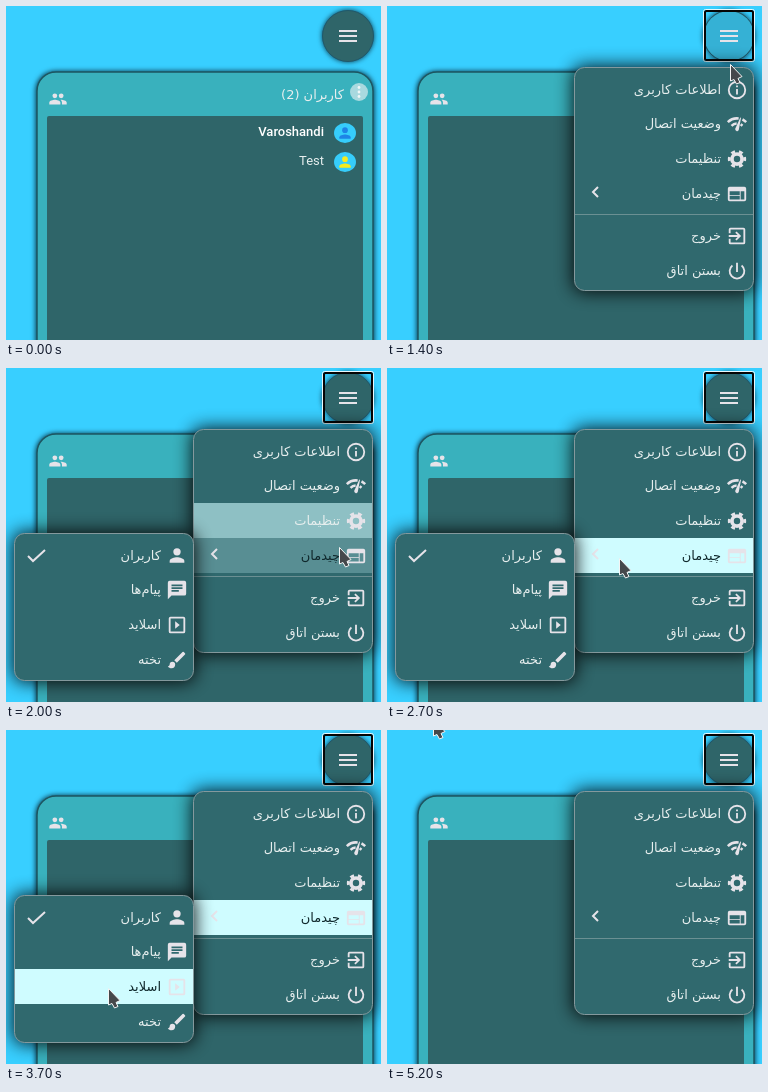
These frames come from a looping animation (375x334 px, 5300 ms). An HTML page:

```html
<!DOCTYPE html>
<html lang="fa">
<head>
<meta charset="utf-8">
<style>
html, body { margin: 0; width: 100%; height: 100%; overflow: hidden; background: #38cfff; }
svg { display: block; }
text { font: 13px "DejaVu Sans", sans-serif; fill: #e6eeee; }
.fa { direction: rtl; text-anchor: start; }
.user { font-family: Roboto, sans-serif; text-anchor: end; }
.strong { font-weight: 500; fill: #fff; }
.icon { fill: #e6e3e9; fill-rule: evenodd; }
.line { fill: none; stroke: #e6e3e9; stroke-width: 2; }
.shade { filter: blur(9px); fill: #000; opacity: .9; }
.soft { filter: blur(2.5px); fill: #0b3a4c; }
</style>
</head>
<body>
<svg id="stage" width="375" height="334" viewBox="0 0 375 334"></svg>
<script>
const LOOP = 5300, STEP = 100;
const stage = document.getElementById('stage');

function add(parent, tag, attrs = {}, text) {
  const el = document.createElementNS('http://www.w3.org/2000/svg', tag);
  for (const k in attrs) el.setAttribute(k, attrs[k]);
  if (text) el.textContent = text;
  parent.append(el);
  return el;
}

const path = d => `<path d="${d}"/>`;
const line = d => `<path class="line" d="${d}"/>`;
const person = '<circle cx="12" cy="8" r="4"/>' + path('M12 14c-2.7 0-8 1.3-8 4v2h16v-2c0-2.7-5.3-4-8-4z');
const icons = {
  info: '<circle class="line" cx="12" cy="12" r="9"/>' + line('M12 11v6M12 7v2'),
  signal: '<path class="line" style="stroke-width:2.8" d="M2 10A14.2 14.2 0 0 1 13.8 6M18 7Q20.3 8.3 22 10M6 14Q8.5 11.6 11.6 11.5M16 12.4L18 14"/>' +
    path('M16.4 5.2L14 18.4A2 2 0 1 1 10.2 17L15.5 5.2Q16 4.6 16.4 5.2z'),
  gear: '<circle class="line" cx="12" cy="12" r="5.5" style="stroke-width:4"/>' +
    '<circle class="line" cx="12" cy="12" r="8.4" pathLength="12" stroke-dasharray="1" stroke-dashoffset=".5" style="stroke-width:3.2"/>',
  layout: path('M4 4h16a2 2 0 0 1 2 2v12a2 2 0 0 1-2 2H4a2 2 0 0 1-2-2V6a2 2 0 0 1 2-2zM4 9v4h11V9zM4 14v4h11v-4zM16 9v9h4V9z'),
  exit: path('M10.1 15.6L11.5 17l5-5-5-5-1.4 1.4L12.7 11H3v2h9.7zM3 9V5a2 2 0 0 1 2-2h14a2 2 0 0 1 2 2v14a2 2 0 0 1-2 2H5a2 2 0 0 1-2-2v-4h2v4h14V5H5v4z'),
  power: line('M12 3v10M17 6A8 8 0 1 1 7 6'),
  person,
  chat: path('M20 2H4a2 2 0 0 0-2 2v18l4-4h14a2 2 0 0 0 2-2V4a2 2 0 0 0-2-2zM6 6h12v2H6zM6 9h12v2H6zM6 12h8v2H6z'),
  slide: path('M10 8v8l5-4zM19 3H5a2 2 0 0 0-2 2v14a2 2 0 0 0 2 2h14a2 2 0 0 0 2-2V5a2 2 0 0 0-2-2zM5 5h14v14H5z'),
  brush: path('M7 14a3 3 0 0 0-3 3c0 1.3-1.2 2-2 2 .9 1.2 2.5 2 4 2a4 4 0 0 0 4-4 3 3 0 0 0-3-3zM20.7 4.6l-1.3-1.3a1 1 0 0 0-1.4 0L9 12.3 11.8 15l8.9-9a1 1 0 0 0 0-1.4z'),
  group: '<circle cx="16" cy="8" r="3"/><circle cx="8" cy="8" r="3"/>' +
    path('M8 13c-2.3 0-7 1.2-7 3.5V19h14v-2.5C15 14.2 10.3 13 8 13zM16 13l-1 .1c1.2.8 2 2 2 3.4V19h6v-2.5c0-2.3-4.7-3.5-7-3.5z')
};

function icon(parent, name, cx, cy, size, fill) {
  const s = size / 24;
  const g = add(parent, 'g', { class: 'icon', transform: `translate(${cx - size / 2} ${cy - size / 2}) scale(${s})` });
  if (fill) g.style.fill = fill;
  g.innerHTML = icons[name];
}

// user panel
add(stage, 'rect', { class: 'soft', x: 29.5, y: 65, width: 339, height: 300, rx: 20 });
add(stage, 'rect', { x: 31, y: 66, width: 336, height: 300, rx: 19, fill: '#39b1bd', stroke: '#1d5661', 'stroke-width': 1.5 });
add(stage, 'rect', { x: 41, y: 110, width: 316, height: 240, rx: 2, fill: '#2f6569' });
icon(stage, 'group', 52, 93, 19);
add(stage, 'text', { class: 'fa', x: 338, y: 93 }, 'کاربران (2)');
add(stage, 'circle', { cx: 353, cy: 86, r: 9, fill: '#a8d9df' });
for (const y of [81.5, 86, 90.5]) add(stage, 'circle', { cx: 353, cy: y, r: 1.4, fill: '#f0f6f7' });
[['Varoshandi', 127, '#1e83e6', ' strong'], ['Test', 156, '#f6ea1c', '']].forEach(([name, y, fill, cls]) => {
  add(stage, 'text', { class: 'user' + cls, x: 318, y: y + 3 }, name);
  add(stage, 'ellipse', { cx: 339, cy: y, rx: 11, ry: 10, fill: '#36cdfb' });
  icon(stage, 'person', 339, y, 17, fill);
});

// round button
add(stage, 'circle', { class: 'soft', cx: 342, cy: 30, r: 26 });
add(stage, 'circle', { cx: 342, cy: 30, r: 25.5, fill: '#2f6569', stroke: '#20586a' });
const glow = add(stage, 'circle', { cx: 342, cy: 30, r: 25, fill: '#38cfff' });
add(stage, 'path', { class: 'line', d: 'M333 25h18M333 30h18M333 35h18' });
const focus = add(stage, 'g', { fill: 'none' });
add(focus, 'rect', { x: 316.5, y: 3.5, width: 51, height: 52, rx: 2, stroke: '#e8f8fc' });
add(focus, 'rect', { x: 318, y: 5, width: 48, height: 49, rx: 1.5, stroke: '#050505', 'stroke-width': 2 });

// menus
function menu(x, y, h) {
  const g = add(stage, 'g');
  add(g, 'rect', { class: 'shade', x: x - 1, y: y - 1, width: 182, height: h + 2, rx: 10 });
  add(g, 'rect', { x: x + .5, y: y + .5, width: 179, height: h - 1, rx: 10, fill: '#30696e', stroke: '#84999d' });
  return g;
}

const rows = [];
function row(g, x, y, name, label, on = -1, off = -1) {
  const bg = add(g, 'rect', { x: x + 1, y, width: 178, height: 35, fill: '#cffcff' });
  const text = add(g, 'text', { class: 'fa', x: x + 147, y: y + 22 }, label);
  icon(g, name, x + 163, y + 18, 22);
  rows.push({ bg, text, on, off });
}

const main = menu(187, 61, 224);
row(main, 187, 66, 'info', 'اطلاعات کاربری', 1500, 1600);
row(main, 187, 100, 'signal', 'وضعیت اتصال', 1600, 1800);
row(main, 187, 135, 'gear', 'تنظیمات', 1800, 2000);
row(main, 187, 170, 'layout', 'چیدمان', 2000, 4400);
row(main, 187, 212, 'exit', 'خروج');
row(main, 187, 247, 'power', 'بستن اتاق');
add(main, 'path', { class: 'line', d: 'M211 181l-5 5 5 5' });
add(main, 'rect', { x: 188, y: 208, width: 178, height: 1, fill: '#6b9093' });

const sub = menu(8, 165, 148);
row(sub, 8, 169.5, 'person', 'کاربران', 2800, 3400);
row(sub, 8, 204, 'chat', 'پیام\u200cها', 3400, 3500);
row(sub, 8, 239, 'slide', 'اسلاید', 3500, 4400);
row(sub, 8, 274, 'brush', 'تخته');
add(sub, 'path', { class: 'line', d: 'M22 188l5 5L39 182' });

const cursor = add(stage, 'path', {
  d: 'M.5 .5V17L4 15.5L6.5 20L10 18.5L8 14.5L12 12.5Z',
  fill: '#45484b', stroke: '#f4f4f4', 'stroke-linejoin': 'round'
});

// time, x, y of the pointer; no position means it is outside
const moves = [
  [0], [300, 252, 139], [400, 268, 118], [500, 290, 92], [600, 313, 66], [700, 331, 45], [800, 341, 31],
  [1400, 343, 58], [1500, 341, 84], [1600, 337, 114], [1700, 334, 137], [1800, 334, 151], [1900, 334, 163],
  [2000, 333, 179], [2100, 333, 186], [2200, 333, 190], [2400, 285, 190],
  [2700, 232, 190], [2800, 165, 189], [2900, 124, 188], [3000, 110, 187],
  [3400, 109, 211], [3500, 106, 240], [3600, 103, 253], [3700, 102, 258],
  [4300, 52, 240], [4400], [4900, 19, -3], [5200, 46, -11]
];

const rise = [.25, .82, 1], fall = [.72, .15, 0];
const at = (list, n) => list[Math.min(n, list.length - 1)];

function hover(t, on, off) {
  if (on < 0 || t < on) return 0;
  const level = at(rise, (Math.min(t, off - STEP) - on) / STEP);
  return t < off ? level : level * at(fall, (t - off) / STEP);
}

const show = (el, on) => el.style.display = on ? '' : 'none';

function render(time) {
  const t = Math.floor(time % LOOP / STEP) * STEP;
  glow.setAttribute('opacity', hover(t, 700, 1400));
  show(focus, t >= 900);
  show(main, t >= 1000);
  show(sub, t >= 2000 && t < 4500);
  for (const r of rows) {
    r.bg.setAttribute('opacity', hover(t, r.on, r.off));
    r.text.style.fill = t >= r.on && t < r.off ? '#10282c' : '';
  }
  const [, x, y] = moves.filter(m => m[0] <= t).pop();
  show(cursor, x !== undefined);
  if (x !== undefined) cursor.setAttribute('transform', `translate(${x} ${y})`);
}

const start = performance.now();
function tick() {
  render(performance.now() - start);
  requestAnimationFrame(tick);
}
tick();
</script>
</body>
</html>
```
